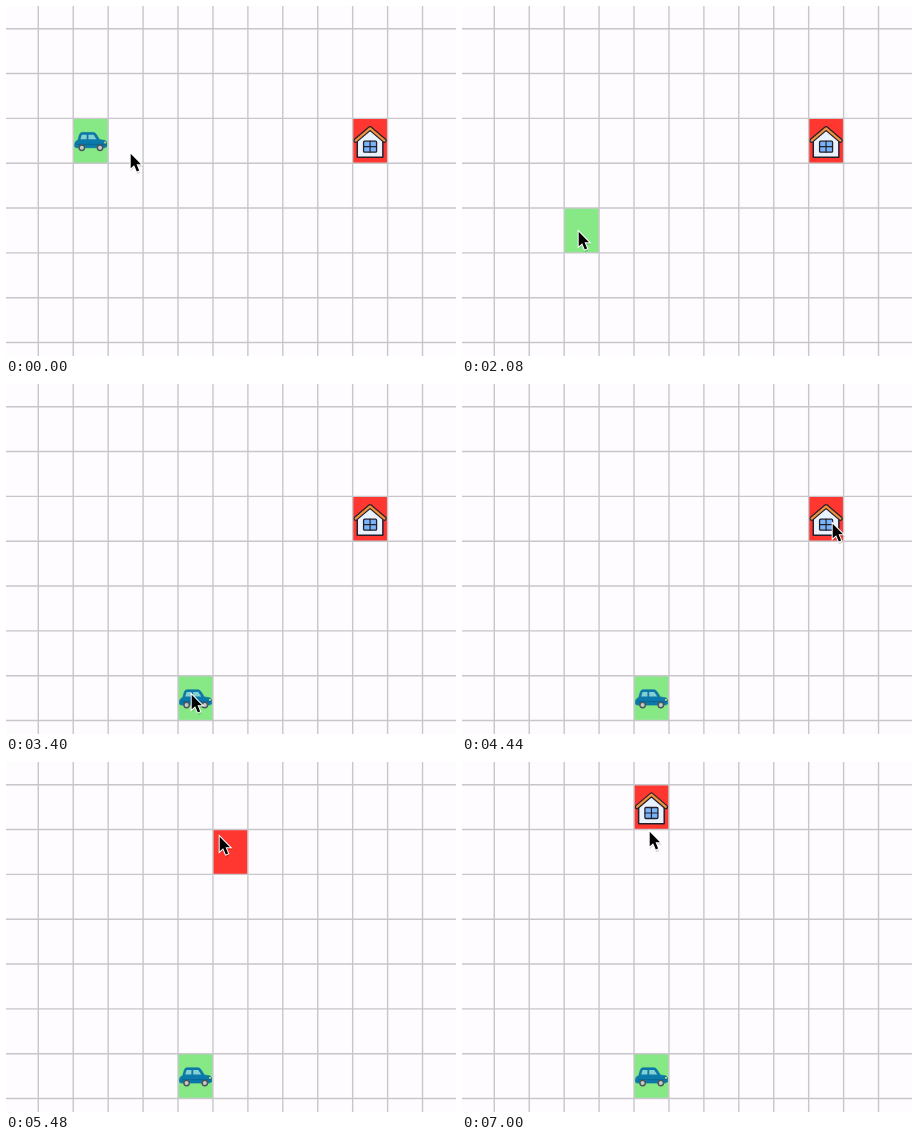
These frames come from a looping animation (450 px wide and 350 px high, 7040 ms). An HTML page:

```html
<!DOCTYPE html>
<html lang="en">
<head>
<meta charset="utf-8">
<title>Drag on a grid</title>
<style>
  html, body { margin: 0; width: 100%; height: 100%; overflow: hidden; background: #fefcff; }
  svg { display: block; width: 100vw; height: 100vh; }
</style>
</head>
<body>
<svg viewBox="0 0 450 350">
  <g id="start">
    <rect id="startFill" fill="#86e986"/>
    <g id="car">
      <path fill="#0b79aa" stroke="#0a6c9c" stroke-width=".6" stroke-linejoin="round"
        d="M1.6 28.6Q.6 23.2 4.6 22L6.4 16Q6.9 14.2 9 14.1H20Q22 14.2 23.2 16.2L26.2 21.2L32 22.2Q34.2 23.4 33.4 28.4L31 29.4H3.6Z"/>
      <path fill="#86cfd0" d="M7.2 20.8L8.6 16.4H13.4V20.8ZM15.2 16.4H20.2L23.2 20.8H15.2Z"/>
      <path fill="none" stroke="#075e8a" stroke-width=".7" d="M4 26H33"/>
      <path fill="#e0d57a" d="M31 23.2h1.8v1.8H31z"/>
      <g fill="#c3cbc9" stroke="#4c5558" stroke-width="1.4">
        <circle cx="8.6" cy="29.4" r="2.7"/>
        <circle cx="26.8" cy="29.4" r="2.7"/>
      </g>
    </g>
  </g>
  <g id="goal">
    <rect id="goalFill" fill="#ff3730"/>
    <g id="house" stroke="#24202a" stroke-linejoin="round" stroke-linecap="round">
      <path fill="#e9f3ff" stroke-width="1.5" d="M4.6 22L17.4 11.5L30.2 22V39H4.6Z"/>
      <path fill="none" stroke-width="4.6" d="M3 22.2L17.4 10L31.8 22.2"/>
      <path fill="none" stroke="#f0913f" stroke-width="2.2" d="M3 22.2L17.4 10L31.8 22.2"/>
      <rect x="10.9" y="22.8" width="13" height="11" rx="1" fill="#79b4fa" stroke-width="1.3"/>
      <path fill="none" stroke-width="1.2" d="M17.4 22.8V33.8M10.9 28.3H23.9"/>
    </g>
  </g>
  <path id="lines" fill="none" stroke="#c7c6ca" stroke-width="1.4"/>
  <g id="cursor">
    <g transform="translate(-.3 .8) scale(.91)">
      <path fill="#000" opacity=".14" transform="translate(.6 1.6)"
        d="M-.8-1.5V17.6L3.5 13.8L6.4 20.8L10.2 19.2L7.3 12.6H13Z"/>
      <path stroke="#fff" stroke-width="2.2" paint-order="stroke" stroke-linejoin="miter"
        d="M0 0V16L3.8 12.5L6.7 19.4L9.3 18.3L6.4 11.6H11.3Z"/>
    </g>
  </g>
</svg>
<script>
const LOOP = 7040, STEP = 40;
const LEFT = 32.3, TOP = 22.7, CELL_W = 34.93, CELL_H = 44.83;
const $ = id => document.getElementById(id);
const colX = c => LEFT + CELL_W * c;
const rowY = r => TOP + CELL_H * r;

const hold = () => 0;
const inOut = p => (1 - Math.cos(Math.PI * p)) / 2;
const easeIn = p => p ** 1.4;
const easeOut = p => 1 - (1 - p) ** 1.8;

// time, x, y, easing towards the next point
const path = [
  [0, 125, 147, easeOut],
  [440, 93, 137, hold],
  [1280, 93, 137, easeIn],
  [2080, 117, 225, easeOut],
  [2680, 187, 311, hold],
  [2800, 187, 311, inOut],
  [2840, 186, 310, hold],
  [3720, 186, 310, inOut],
  [4440, 371, 139, easeOut],
  [4600, 369, 136, hold],
  [4800, 369, 136, inOut],
  [5480, 214, 74, easeOut],
  [5920, 187, 40, hold],
  [6200, 187, 40, inOut],
  [7000, 188, 69, hold],
  [LOOP, 188, 69, hold]
];

const items = [
  { box: $("start"), fill: $("startFill"), icon: $("car"), from: [1, 2], to: [4, 6], grab: 1280, drop: 3120 },
  { box: $("goal"), fill: $("goalFill"), icon: $("house"), from: [9, 2], to: [4, 0], grab: 4800, drop: 6200 }
];

function pointAt(t) {
  let i = 0;
  while (i < path.length - 2 && path[i + 1][0] <= t) i++;
  const [t0, x0, y0, ease] = path[i], [t1, x1, y1] = path[i + 1];
  const k = ease((t - t0) / (t1 - t0));
  return [x0 + (x1 - x0) * k, y0 + (y1 - y0) * k];
}

const cellAt = ([x, y]) => [Math.floor((x - LEFT) / CELL_W), Math.floor((y - TOP) / CELL_H)];
const move = (el, x, y) => el.setAttribute("transform", `translate(${x} ${y})`);
const show = (el, on) => el.setAttribute("visibility", on ? "visible" : "hidden");

function place(item, t, point) {
  const dragging = t >= item.grab && t < item.drop;
  const cell = dragging ? cellAt(point) : t < item.grab ? item.from : item.to;
  const atHome = cell[0] === item.from[0] && cell[1] === item.from[1];
  move(item.box, colX(cell[0]), rowY(cell[1]));
  // a grabbed cell stays empty until the pointer leaves it
  show(item.fill, !(dragging && atHome));
  show(item.icon, !dragging);
}

function draw(now) {
  const t = Math.floor((now % LOOP) / STEP) * STEP;
  const point = pointAt(t);
  items.forEach(item => place(item, t, point));
  move($("cursor"), ...point);
}

for (const { fill } of items) {
  fill.setAttribute("width", CELL_W);
  fill.setAttribute("height", CELL_H);
}

let grid = "";
for (let c = 0; c < 12; c++) grid += `M${colX(c)} 0V350`;
for (let r = 0; r < 8; r++) grid += `M0 ${rowY(r)}H450`;
$("lines").setAttribute("d", grid);

const begin = performance.now();
function tick() {
  draw(performance.now() - begin);
  requestAnimationFrame(tick);
}
tick();
</script>
</body>
</html>
```
